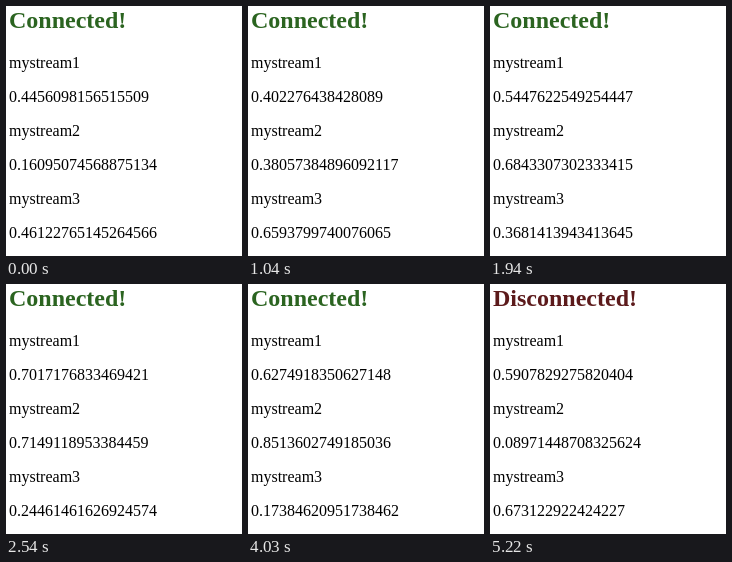
Recreate the animation shown at these times as an HTML page. Size 236x250 px, loop 8560 ms.

```html
<!DOCTYPE html>
<html lang="en">
<head>
<meta charset="utf-8">
<title>Stream status</title>
<style>
  html, body { margin: 0; width: 100%; height: 100%; overflow: hidden; background: #fff; }
  svg { display: block; }
  text { font: 16px "Liberation Serif", Times, serif; fill: #000; }
  #status { font-size: 24px; font-weight: bold; fill: #2b6420; }
  #status.off { fill: #5c1a1b; }
</style>
</head>
<body>
<svg width="236" height="250" viewBox="0 0 236 250">
  <text id="status" x="3" y="22">Connected!</text>
  <text x="3" y="62">mystream1</text>
  <text class="value" x="3" y="96"></text>
  <text x="3" y="130">mystream2</text>
  <text class="value" x="3" y="164"></text>
  <text x="3" y="198">mystream3</text>
  <text class="value" x="3" y="232"></text>
</svg>
<script>
  const LOOP = 8560, CLOSED_AT = 5220;

  // Start time in ms, then the three stream readings
  const updates = [
    [0, "0.4456098156515509", "0.16095074568875134", "0.46122765145264566"],
    [440, "0.4718350264917382", "0.7260418395172846", "0.8351927460183527"],
    [1040, "0.402276438428089", "0.38057384896092117", "0.6593799740076065"],
    [1490, "0.6187402953618274", "0.5293816047251938", "0.8046137295810463"],
    [1940, "0.5447622549254447", "0.6843307302333415", "0.3681413943413645"],
    [2540, "0.7017176833469421", "0.7149118953384459", "0.24461461626924574"],
    [2990, "0.5820463917258304", "0.4392751860342719", "0.6915380274619583"],
    [3430, "0.4338961476460099", "0.5668145143426955", "0.25419567339122295"],
    [4030, "0.6274918350627148", "0.8513602749185036", "0.17384620951738462"],
    [4470, "0.8373933264520019", "0.3316047911066562", "0.5469926481600851"],
    [5070, "0.5907829275820404", "0.08971448708325624", "0.673122922424227"]
  ];

  const status = document.getElementById("status");
  const values = document.querySelectorAll(".value");
  const start = performance.now();

  function setText(node, text) {
    if (node.textContent !== text) node.textContent = text;
  }

  function draw() {
    const t = (performance.now() - start) % LOOP;
    const [, ...readings] = updates.findLast(([at]) => at <= t);
    const closed = t >= CLOSED_AT;
    values.forEach((node, i) => setText(node, readings[i]));
    setText(status, closed ? "Disconnected!" : "Connected!");
    status.classList.toggle("off", closed);
    requestAnimationFrame(draw);
  }
  draw();
</script>
</body>
</html>
```
